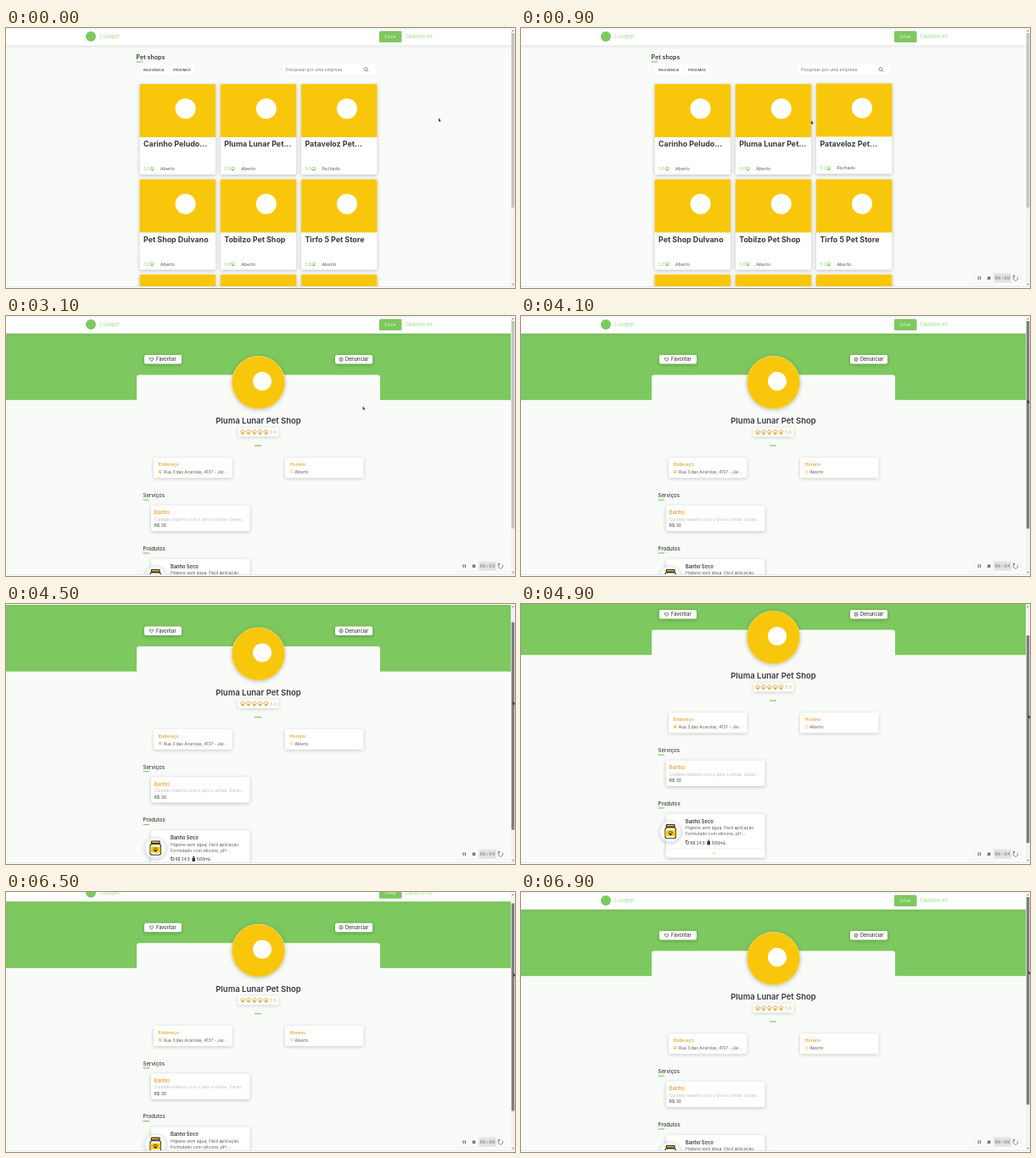
An HTML page with a canvas for the animation above (7000 ms loop, 600x307 px).

```html
<!DOCTYPE html>
<html lang="pt-BR">
<head>
<meta charset="utf-8">
<title>Pet shops</title>
<style>
  html, body { margin: 0; width: 100%; height: 100%; overflow: hidden; background: #f9fbf9; }
  canvas { display: block; width: 600px; height: 307px; }
</style>
</head>
<body>
<canvas id="stage"></canvas>
<script>
const W = 600, H = 307, LOOP = 7000, STEP = 100;
const OPEN = 1500, LOADED = 2600, GRAB = 3800;
const C = {
  page: '#f9fbf9', green: '#7dc85f', pale: '#a0d88b', yellow: '#f8c70c',
  orange: '#e89c22', gold: '#dfae4a', dark: '#3a3a3a', text: '#5a5a5a', mute: '#bdbdbd'
};
const canvas = document.getElementById('stage');
const g = canvas.getContext('2d');
const dpr = window.devicePixelRatio || 1;
canvas.width = W * dpr;
canvas.height = H * dpr;

const shops = [
  ['Carinho Peludo...', 'Aberto'], ['Pluma Lunar Pet...', 'Aberto'], ['Pataveloz Pet...', 'Fechado'],
  ['Pet Shop Dulvano', 'Aberto'], ['Tobilzo Pet Shop', 'Aberto'], ['Tirfo 5 Pet Store', 'Aberto'],
  ['', ''], ['', ''], ['', '']
];

const cursorPath = [
  [0, 511, 108.5], [900, 343, 111.5], [1300, 304, 114], [2700, 304, 114], [3700, 598, 101],
  [4100, 598, 101], [4900, 599, 133], [5300, 599, 150], [5700, 599, 150], [6100, 599, 108], [6600, 599, 95]
];
const scrollPath = [[4100, 0], [4900, 39], [5300, 64], [6100, 64], [6300, 28], [6600, 0]];

// Linear interpolation of column k along a list of [time, ...values]
function along(path, t, k = 1) {
  if (t <= path[0][0]) return path[0][k];
  for (let i = 1; i < path.length; i++) {
    const a = path[i - 1], b = path[i];
    if (t <= b[0]) return a[k] + (b[k] - a[k]) * (t - a[0]) / (b[0] - a[0]);
  }
  return path[path.length - 1][k];
}

function rect(x, y, w, h, color) {
  g.fillStyle = color;
  g.fillRect(x, y, w, h);
}

function round(x, y, w, h, r, color) {
  g.beginPath();
  g.roundRect(x, y, w, h, r);
  g.fillStyle = color;
  g.fill();
}

function disc(x, y, r, color) {
  g.beginPath();
  g.arc(x, y, r, 0, Math.PI * 2);
  g.fillStyle = color;
  g.fill();
}

function ring(x, y, r, color, width = 0.7, from = 0, to = Math.PI * 2) {
  g.beginPath();
  g.arc(x, y, r, from, to);
  g.strokeStyle = color;
  g.lineWidth = width;
  g.stroke();
}

function line(color, width, ...pts) {
  g.beginPath();
  for (let i = 0; i < pts.length; i += 2) g.lineTo(pts[i], pts[i + 1]);
  g.strokeStyle = color;
  g.lineWidth = width;
  g.stroke();
}

function shape(color, ...pts) {
  g.beginPath();
  for (let i = 0; i < pts.length; i += 2) g.lineTo(pts[i], pts[i + 1]);
  g.closePath();
  g.fillStyle = color;
  g.fill();
}

function shadowed(draw, blur = 4, alpha = 0.2, dy = 1) {
  g.save();
  g.shadowColor = `rgba(0,0,0,${alpha})`;
  g.shadowBlur = blur * dpr;
  g.shadowOffsetY = dy * dpr;
  draw();
  g.restore();
}

function box(x, y, w, h, r = 2, blur = 4, alpha = 0.2) {
  shadowed(() => round(x, y, w, h, r, '#fff'), blur, alpha);
}

function text(s, x, y, size, color = C.text, weight = 400, align = 'left') {
  g.font = `${weight} ${size}px Inter, "Open Sans", sans-serif`;
  g.textAlign = align;
  g.fillStyle = color;
  g.fillText(s, x, y);
}

function paw(x, y, s, color) {
  g.fillStyle = color;
  for (const [dx, dy] of [[-0.8, -0.15], [-0.32, -0.75], [0.32, -0.75], [0.8, -0.15]]) {
    g.beginPath();
    g.ellipse(x + dx * s, y + dy * s, 0.23 * s, 0.32 * s, dx * 0.3, 0, Math.PI * 2);
    g.fill();
  }
  g.beginPath();
  g.ellipse(x, y + 0.5 * s, 0.6 * s, 0.5 * s, 0, 0, Math.PI * 2);
  g.fill();
}

function heart(x, y, s, color) {
  g.beginPath();
  g.moveTo(x, y + s);
  g.bezierCurveTo(x - 2 * s, y - 0.3 * s, x - 0.9 * s, y - 1.6 * s, x, y - 0.5 * s);
  g.bezierCurveTo(x + 0.9 * s, y - 1.6 * s, x + 2 * s, y - 0.3 * s, x, y + s);
  g.strokeStyle = color;
  g.lineWidth = 0.7;
  g.stroke();
}

function clock(x, y, r, color) {
  ring(x, y, r, color, 0.6);
  line(color, 0.6, x, y - r * 0.6, x, y, x + r * 0.4, y + r * 0.2);
}

function loading(x, y, t) {
  text('Carregando...', x, y, 5.1, '#777');
  const a = t / 800 * Math.PI * 2;
  ring(x + 42.5, y - 1.8, 2.9, '#dedede', 0.8);
  ring(x + 42.5, y - 1.8, 2.9, '#999', 0.8, a, a + 1.8);
}

function heading(s, y) {
  text(s, 161.5, y, 6.1, C.dark, 500);
  rect(161.5, y + 2.6, 7.5, 1.1, C.green);
}

function header() {
  shadowed(() => rect(0, 0, 595, 20.5, '#fff'), 3, 0.1);
  rect(0, 0, W, 1, '#ececec');
  disc(100, 10, 6, C.green);
  text('Luvapet', 111, 12.2, 6, C.pale);
  round(440, 3.5, 26.5, 13.5, 1.5, C.green);
  text('Entrar', 453.2, 12, 4.7, '#e4f4de', 400, 'center');
  text('Cadastre-se', 470.5, 12, 5.5, C.pale);
}

function shopCard(i, lift) {
  const x = 157.6 + i % 3 * 95.2, y = 66.2 + Math.floor(i / 3) * 112.5 - lift;
  const [name, status] = shops[i];
  box(x, y, 89.4, 106.8, 1, 4, 0.26);
  rect(x, y, 89.4, 62.8, C.yellow);
  disc(x + 54, y + 29, 12, '#fff');
  if (!name) return;
  text(name, x + 4.4, y + 74, 8.9, C.dark, 650);
  text('5.0', x + 4.6, y + 101.8, 5, '#8fcf77');
  paw(x + 14.7, y + 100.2, 2.4, C.green);
  text(status, x + 24.4, y + 101.8, 5.3);
}

function listPage(t) {
  text('Pet shops', 153.5, 36.6, 7.1, C.dark, 600);
  rect(153.5, 39.4, 7.5, 1.1, C.green);
  box(158, 43, 33, 12, 1.5, 2, 0.03);
  box(193, 43, 29, 12, 1.5, 2, 0.03);
  text('RELEVÂNCIA', 162, 50.5, 3.9, C.dark, 500);
  text('PRÓXIMOS', 197, 50.5, 3.9, C.dark, 500);
  box(326, 43, 110, 12, 2, 2, 0.03);
  text('Pesquisar por uma empresa', 330, 51.2, 5, '#777');
  ring(424, 48.6, 2, '#666');
  line('#666', 0.8, 425.5, 50.1, 427.2, 51.8);
  const hover = t >= 1000 ? 1 : t >= 500 ? 2 : -1;
  for (let i = 0; i < shops.length; i++) shopCard(i, i === hover ? 0.7 : 0);
}

function smallButton(x, label) {
  box(x, 46, 44, 10.5, 2, 4, 0.25);
  text(label, x + (label[0] === 'F' ? 14 : 12), 53.2, 5.6, C.dark, 500);
}

function profileTop() {
  rect(0, 20.5, 595, 78.7, C.green);
  header();
  round(154, 69.5, 287, 60, 3, C.page);
  smallButton(163, 'Favoritar');
  heart(171.5, 51.3, 2, C.dark);
  smallButton(388, 'Denunciar');
  ring(395, 51.2, 2.1, C.dark);
  line(C.dark, 0.7, 395, 50, 395, 52.4);
  shadowed(() => disc(297.5, 78.5, 31.3, C.yellow), 5, 0.25);
  ring(297.5, 78.5, 31.1, '#f3d878', 0.8);
  disc(302, 77, 11, '#fff');
}

function waiting(t) {
  box(270, 116, 55, 15.5);
  loading(275, 126, t);
  rect(293, 141.5, 8, 1.2, C.green);
  for (const [x, label] of [[174, 'Endereço:'], [329, 'Horário:']]) {
    box(x, 157, 92.5, 37.5);
    text(label, x + 5.7, 166.8, 5.2, C.orange, 500);
    loading(x + 19, 182.3, t);
  }
  heading('Serviços', 217.3);
  g.beginPath();
  g.roundRect(291.5, 232.5, 11.5, 14.5, 1);
  g.strokeStyle = '#cfcfcf';
  g.lineWidth = 1;
  g.stroke();
  shape('#cfcfcf', 299, 232, 303.5, 236.5, 299, 236.5);
  for (let y = 238.5; y < 245; y += 2.4) line('#cfcfcf', 0.9, 294, y, 300.5, y);
  text('Lista de serviços', 297, 261, 7, C.dark, 600, 'center');
  text('A empresa não possui nenhum serviço.', 297.5, 269.6, 5.1, C.text, 400, 'center');
  box(168.5, 282, 259, 12, 1, 2, 0.08);
  text('CARREGAR MAIS PRODUTOS', 297.3, 289.6, 4, C.orange, 500, 'center');
  heading('Produtos', 309);
}

function jar(x, y) {
  shadowed(() => disc(x, y, 12.8, '#fff'), 4, 0.22);
  ring(x, y, 12.2, '#dfeaea', 1);
  round(x - 5.5, y - 8.7, 11, 4, 1, '#333');
  rect(x - 4.3, y - 7.5, 8.6, 1.4, C.yellow);
  round(x - 6.8, y - 5, 13.6, 13.7, 2.5, '#333');
  round(x - 5.7, y - 4, 11.4, 11.6, 1.8, '#fff');
  rect(x - 6, y - 1.5, 12, 7, C.yellow);
  paw(x, y + 2, 2.5, '#333');
}

function product() {
  box(171, 286.7, 116.5, 51.8, 2, 4, 0.24);
  jar(176.2, 307.6);
  text('Banho Seco', 194, 297.5, 5.7, C.dark, 600);
  text('Higiene sem água, Fácil aplicação.', 194, 305.4, 5);
  text('Formulado com silicone, pH ...', 194, 312.4, 5);
  ring(196.3, 320.7, 1.7, C.dark, 0.8, -1.6, 3.6);
  shape(C.dark, 194, 318.3, 196.5, 318.1, 194.4, 320.5);
  text('R$ 24,9', 199.5, 322.5, 4.7, C.dark);
  round(219.4, 319, 3.6, 4.4, 0.7, C.dark);
  rect(220, 317.6, 2.4, 1, C.dark);
  text('500mL', 224.7, 322.5, 5.2, C.dark);
  rect(171, 327.4, 116.5, 0.5, '#e6e6e6');
  line(C.orange, 0.8, 226.7, 332.8, 228, 334.1, 229.3, 332.8);
}

function details() {
  text('Pluma Lunar Pet Shop', 297.5, 127.2, 9.5, C.dark, 600, 'center');
  box(273.5, 132, 48, 10.5, 2, 4, 0.18);
  for (let i = 0; i < 5; i++) paw(279 + i * 6.9, 137.2, 2.9, C.gold);
  text('5.0', 311.5, 139, 5, C.gold);
  rect(293, 152.5, 8, 1.2, C.green);
  box(174, 167.3, 92.5, 24);
  text('Endereço', 179.7, 177, 5.3, C.orange, 500);
  ring(181.7, 183.4, 1.4, C.orange, 0.7);
  shape(C.orange, 180.5, 184.3, 182.9, 184.3, 181.7, 186.3);
  text('Rua 3 das Acerolas, 4137 - Jar...', 186, 186, 4.9);
  box(329, 167.3, 92.5, 24);
  text('Horário', 334.5, 177, 5.3, C.orange, 500);
  clock(336.7, 184.1, 1.9, '#efc27a');
  text('Aberto', 340.5, 186, 5);
  heading('Serviços', 214);
  box(171, 223.7, 116.5, 30.3, 2, 4, 0.24);
  text('Banho', 174.8, 234, 6, C.orange, 500);
  text('Cuidado máximo com o pelo e unhas. Garan...', 174.8, 241.5, 4.9, C.mute);
  text('R$ 30', 174.8, 249, 5, C.dark);
  heading('Produtos', 276.8);
  product();
}

function scrollbar(t, scroll) {
  rect(595, 0, 5, 305.3, '#f3f3f3');
  const len = t < OPEN ? 206 : t < LOADED ? 220 : 245;
  rect(595.8, 6 + scroll * 0.8, 3.5, len, t >= GRAB ? '#7d7d7d' : '#c4c4c4');
  shape('#777', 596.3, 4, 597.6, 2.4, 598.9, 4);
  shape('#777', 596.3, 302, 597.6, 303.6, 598.9, 302);
  rect(0, 305, W, 2, '#fff');
  rect(0, 305, W, 0.7, '#dedede');
}

function recorder(t) {
  round(534, 289, 56, 12.3, 1.5, 'rgba(243,243,243,.92)');
  round(535, 289.8, 10.5, 10.8, 1, '#fafafa');
  round(546.3, 289.8, 10.5, 10.8, 1, '#fafafa');
  rect(557.3, 289.8, 20.5, 10.8, '#e3e3e3');
  round(578.3, 289.8, 11, 10.8, 1, '#fafafa');
  rect(538.5, 293.3, 1.2, 4, '#777');
  rect(540.8, 293.3, 1.2, 4, '#777');
  rect(549.8, 293.5, 3.6, 3.6, '#777');
  g.font = '6px "Liberation Mono", monospace';
  g.textAlign = 'center';
  g.fillStyle = '#777';
  g.fillText('00:0' + Math.floor(t / 1000), 567.5, 297.4);
  ring(583, 295.4, 2.8, '#777', 0.8, -0.7, 4);
  shape('#777', 579.8, 292, 582.6, 292, 581, 294.8);
}

function cursor(t) {
  const x = along(cursorPath, t, 1), y = along(cursorPath, t, 2);
  g.save();
  g.translate(x, y);
  g.lineJoin = 'round';
  if (t >= 1200 && t < 2800) {
    round(-0.8, -2.6, 1.6, 5, 0.8, '#fff');
    round(-1.8, -0.3, 4.4, 4, 1, '#fff');
    line('#555', 0.5, -0.6, 0.6, -0.6, -2.4, 0.5, -2.4, 0.5, -0.2, 2.6, 0.3, 2.4, 3.4, -0.6, 3.4, -2, 0.9, -0.6, 0.6);
  } else {
    shape('#333', -1, -2, -1, 2, 0, 1.2, 0.7, 2.6, 1.3, 2.3, 0.7, 0.9, 1.8, 0.8);
  }
  g.restore();
}

function render(t) {
  g.setTransform(dpr, 0, 0, dpr, 0, 0);
  rect(0, 0, W, H, C.page);
  const scroll = along(scrollPath, t);
  g.save();
  g.translate(0, -scroll);
  if (t < OPEN) {
    header();
    listPage(t);
  } else {
    profileTop();
    if (t < LOADED) waiting(t);
    else details();
  }
  g.restore();
  scrollbar(t, scroll);
  if ((t >= 100 && t < OPEN) || t >= LOADED) recorder(t);
  cursor(t);
}

const start = performance.now();
function tick() {
  const t = (performance.now() - start) % LOOP;
  render(Math.floor(t / STEP) * STEP);
  requestAnimationFrame(tick);
}
tick();
</script>
</body>
</html>
```
